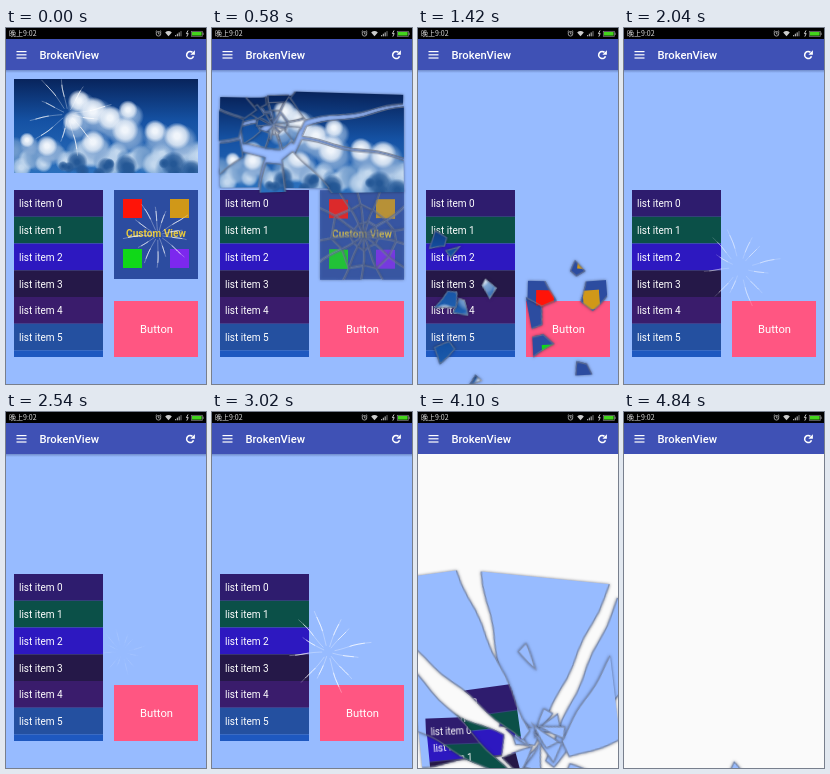
Write an HTML page with a canvas that moves like this. It is 200x356 px and loops after 4860 ms.

```html
<!DOCTYPE html>
<html lang="zh">
<head>
<meta charset="utf-8">
<title>BrokenView</title>
<style>
html, body { margin: 0; width: 100%; height: 100%; overflow: hidden; background: #fafafa; }
canvas { display: block; width: 200px; height: 356px; }
</style>
</head>
<body>
<canvas id="stage" width="200" height="356"></canvas>
<script>
const W = 200, H = 356, LOOP = 4860;
const FONT = 'Roboto, sans-serif';
const ctx = document.getElementById('stage').getContext('2d');

function layer(draw) {
  const c = document.createElement('canvas');
  c.width = W;
  c.height = H;
  draw(c.getContext('2d'));
  return c;
}

function rng(seed) {
  return () => {
    seed = (seed * 16807) % 2147483647;
    return seed / 2147483647;
  };
}

function box(g, color, x, y, w, h) {
  g.fillStyle = color;
  g.fillRect(x, y, w, h);
}

function label(g, text, x, y, size, color = '#fff', weight = 400, align = 'left') {
  g.font = `${weight} ${size}px ${FONT}`;
  g.fillStyle = color;
  g.textAlign = align;
  g.fillText(text, x, y);
}

function line(g, color, width, ...pts) {
  g.strokeStyle = color;
  g.lineWidth = width;
  g.beginPath();
  pts.forEach(p => g.lineTo(p[0], p[1]));
  g.stroke();
}

// ---- Static parts ----
const header = layer(g => {
  box(g, '#000', 0, 0, W, 11);
  box(g, '#3f51b5', 0, 11, W, 31);
  g.font = "7px 'Noto Sans CJK SC', 'Noto Sans CJK', sans-serif";
  g.fillStyle = '#ddd';
  g.fillText('晚上9:02', 3, 8.3);
  g.strokeStyle = '#bbb';
  g.lineWidth = 0.8;
  g.beginPath();
  g.arc(152.5, 5.8, 2.3, 0, 7);
  g.stroke();
  line(g, '#bbb', 0.7, [152.5, 4.2], [152.5, 6], [153.8, 6]);
  line(g, '#bbb', 0.8, [149.6, 3.8], [151, 2.6]);
  line(g, '#bbb', 0.8, [154, 2.6], [155.4, 3.8]);
  g.fillStyle = '#ccc';
  g.beginPath();
  g.moveTo(162.5, 8.3);
  g.arc(162.5, 8.3, 5, -2.3, -0.84);
  g.fill();
  for (let i = 0; i < 4; i++) box(g, i < 3 ? '#aaa' : '#666', 169 + i * 1.8, 7 - i * 1.3, 1.2, 1.3 + i * 1.3);
  line(g, '#ddd', 0.9, [182, 2.5], [180.4, 5.6], [182.2, 5.6], [180.8, 8.6]);
  g.strokeStyle = '#888';
  g.lineWidth = 0.7;
  g.strokeRect(185.3, 3.3, 11, 5);
  box(g, '#43d51c', 186, 4, 9.6, 3.6);
  box(g, '#888', 196.6, 4.6, 1, 2.4);

  for (const y of [23, 26.2, 29.4]) box(g, '#fff', 10.5, y, 10, 1.2);
  label(g, 'BrokenView', 33.5, 31, 11.2, '#fff', 500);
  g.strokeStyle = '#fff';
  g.lineWidth = 1.6;
  g.beginPath();
  g.arc(184.2, 27, 3.5, 0.35, 5.4);
  g.stroke();
  g.fillStyle = '#fff';
  g.beginPath();
  g.moveTo(188.9, 22.3);
  g.lineTo(188.9, 26.8);
  g.lineTo(184.4, 26.8);
  g.fill();
});

const content = layer(g => {
  box(g, '#97bbff', 0, 42, W, H - 42);
  const rows = ['#2e1c6e', '#0b5048', '#2d18c0', '#251848', '#3a1c6c', '#2450a0', '#1e58c0'];
  rows.forEach((color, i) => {
    const y = 162 + i * 26.75;
    box(g, color, 8, y, 89, Math.min(26.8, 329 - y));
    if (i < 6) label(g, 'list item ' + i, 13, y + 17.3, 10);
  });
  box(g, '#ff5682', 108, 273, 84, 56);
  label(g, 'Button', 150.5, 305.3, 11.2, '#fff', 400, 'center');
});

const photo = layer(g => {
  g.beginPath();
  g.rect(8, 51, 184, 94);
  g.clip();
  const sky = g.createLinearGradient(0, 51, 0, 145);
  sky.addColorStop(0, '#08245c');
  sky.addColorStop(0.45, '#1552a4');
  sky.addColorStop(1, '#2b70bd');
  box(g, sky, 0, 51, W, 94);
  const puff = (x, y, r, color) => {
    const glow = g.createRadialGradient(x, y, r * 0.2, x, y, r);
    glow.addColorStop(0, color);
    glow.addColorStop(0.6, color + 'b0');
    glow.addColorStop(1, color + '00');
    g.fillStyle = glow;
    g.beginPath();
    g.arc(x, y, r, 0, 7);
    g.fill();
  };
  const r = rng(29);
  for (let i = 0; i < 26; i++) puff(8 + i * 7.4, 123 + r() * 18, 8 + r() * 8, i % 3 ? '#c3d8ee' : '#6f9acb');
  [[74, 75, 15], [88, 85, 19], [105, 92, 17], [123, 84, 13], [68, 95, 14], [120, 104, 18],
   [150, 105, 15], [172, 110, 18], [42, 120, 14], [22, 114, 10], [88, 116, 16]]
    .forEach(([x, y, s]) => {
      puff(x + 2, y + 4, s, '#86a9d4');
      puff(x - 1, y - 2, s * 0.75, '#f0f5fb');
    });
  for (let i = 0; i < 14; i++) puff(12 + r() * 176, 134 + r() * 12, 5 + r() * 9, '#245795');
});

const custom = layer(g => {
  box(g, '#2c4ca0', 108, 162, 84, 89);
  box(g, '#ff1408', 117, 171, 19, 19);
  box(g, '#d09818', 164, 171, 19, 19);
  box(g, '#10d818', 117, 221, 19, 19);
  box(g, '#7c28ee', 164, 221, 19, 19);
  label(g, 'Custom View', 150, 208.5, 10.1, '#e6c73c', 700, 'center');
});

// ---- Shattering ----
// ends: where each crack leaves the rect, clockwise; slow: lagging pieces and their speed
function shatter({ image, rect, at, ends, rings, seed, start, fall, speed, slow = {}, drift = 0 }) {
  const rand = rng(seed);
  const [cx, cy] = at;
  const rays = ends.map(([x, y]) => {
    const len = Math.hypot(x - cx, y - cy);
    return { x: (x - cx) / len, y: (y - cy) / len, len, phase: rand() * 6,
             rings: rings.map(r => Math.min(r * (0.85 + rand() * 0.35), len * 0.8)) };
  });
  const point = (ray, d) => {
    const bend = Math.sin(d / 11 + ray.phase) * Math.min(1.3, d / 20);
    return [cx + ray.x * d - ray.y * bend, cy + ray.y * d + ray.x * bend];
  };
  const along = (ray, from, to) =>
    Array.from({ length: 13 }, (_, i) => point(ray, from + (to - from) * i / 12));

  const pieces = [];
  rays.forEach((a, i) => {
    const b = rays[(i + 1) % rays.length];
    for (let k = 0; k <= rings.length; k++) {
      const outer = k === rings.length;
      const a0 = k ? a.rings[k - 1] : 0, b0 = k ? b.rings[k - 1] : 0;
      const a1 = outer ? a.len : a.rings[k], b1 = outer ? b.len : b.rings[k];
      const path = along(a, a0, a1);
      if (outer) {
        const far = 420;
        path.push([cx + a.x * far, cy + a.y * far],
                  [cx + (a.x + b.x) * far, cy + (a.y + b.y) * far],
                  [cx + b.x * far, cy + b.y * far]);
      }
      path.push(...along(b, b0, b1).reverse());
      const corners = [point(a, a0), point(a, a1), point(b, b0), point(b, b1)];
      const sprite = layer(g => {
        g.beginPath();
        g.rect(...rect);
        g.clip();
        g.beginPath();
        path.forEach(p => g.lineTo(p[0], p[1]));
        g.closePath();
        g.clip();
        g.drawImage(image, 0, 0);
        g.strokeStyle = 'rgba(112,120,140,.7)';
        g.lineWidth = 2.4;
        g.stroke();
      });
      const pace = rand(), lag = slow[i * (rings.length + 1) + k];
      pieces.push({
        sprite,
        x: corners.reduce((s, p) => s + p[0], 0) / 4,
        y: corners.reduce((s, p) => s + p[1], 0) / 4,
        speed: lag || (outer ? speed[1] : speed[0]) * (0.8 + pace * 0.4),
        spin: (rand() - 0.5) * (outer ? 0.9 : 1.6) * (lag ? 0.5 : 1),
        tilt: rand() * 0.7,
        drift: (rand() - 0.5) * 16 + drift
      });
    }
  });

  function cracks(radius, alpha, inner = 0.15) {
    ctx.save();
    ctx.beginPath();
    ctx.rect(...rect);
    ctx.clip();
    rays.forEach((ray, i) => {
      const end = radius * (0.82 + 0.18 * Math.sin(i * 2.3 + 1));
      ctx.globalAlpha = alpha * 0.55;
      line(ctx, '#fff', 0.7, ...along(ray, end * inner, end));
      ctx.globalAlpha = alpha;
      line(ctx, '#fff', 0.9, ...along(ray, end * 0.5, end * 0.85));
    });
    ctx.restore();
  }

  function drop(t) {
    const s = (t - fall) / 1000;
    const move = Math.pow(s, 2.5);
    for (const p of pieces) {
      const y = p.speed * move;
      if (y > H + 160) continue;
      ctx.save();
      ctx.globalAlpha = Math.min(1, 0.78 + Math.max(0, s - 0.15) * 2);
      ctx.shadowColor = 'rgba(20,25,45,.55)';
      ctx.shadowBlur = 3;
      ctx.translate(p.x + p.drift * s * s, p.y + y);
      ctx.rotate(p.spin * s * s);
      ctx.scale(Math.cos(p.tilt * s), 1);
      ctx.drawImage(p.sprite, -p.x, -p.y);
      ctx.restore();
    }
  }

  return {
    cracks,
    draw(t) {
      if (t >= fall) drop(t);
      else {
        if (t < fall) ctx.drawImage(image, 0, 0);
        if (t > start) cracks(reach(t - start), 0.8);
      }
    }
  };
}

const reach = ms => 0.26 * ms + 0.0001 * ms * ms;

const windowBreak = shatter({
  image: content, rect: [0, 42, W, H - 42], at: [116, 240], rings: [31], seed: 71,
  ends: [[54, 42], [190, 42], [200, 138], [200, 222], [200, 258], [200, 342], [153, 356],
         [74, 356], [20, 356], [0, 247], [0, 175], [0, 117]],
  start: 2860, fall: 3480, speed: [270, 400], slow: { 22: 63 }
});

const photoBreak = shatter({
  image: photo, rect: [8, 51, 184, 94], at: [62, 86], rings: [15, 32], seed: 413,
  ends: [[36, 51], [56, 51], [83, 51], [192, 61], [192, 112], [118, 145], [75, 145],
         [47, 145], [8, 128], [8, 94], [8, 62]],
  start: -160, fall: 300, speed: [255, 400], drift: -8,
  slow: { 24: 100, 22: 125, 19: 128, 16: 116, 25: 170, 28: 98 }
});

const customBreak = shatter({
  image: custom, rect: [108, 162, 84, 89], at: [152, 207], rings: [13, 30], seed: 907,
  ends: [[128, 162], [146, 162], [167, 162], [192, 178], [192, 199], [192, 215], [192, 238],
         [170, 251], [150, 251], [130, 251], [108, 234], [108, 211], [108, 180]],
  start: -130, fall: 500, speed: [340, 420],
  slow: { 7: 62, 8: 112, 35: 108, 38: 112, 32: 118, 23: 118, 25: 182 }
});

// A short press on the window: cracks spread, then pull back.
function shortPress(t) {
  if (t < 1890 || t > 2600) return;
  const back = Math.max(0, (t - 2300) / 300);
  const radius = reach(Math.min(t, 2300) - 1890) * (1 - back);
  windowBreak.cracks(radius, 0.5 * (1 - back), 0.3);
}

const started = performance.now();

function frame() {
  const t = (performance.now() - started) % LOOP;
  box(ctx, '#fafafa', 0, 0, W, H);
  windowBreak.draw(t);
  shortPress(t);
  if (t < 2400) {
    customBreak.draw(t);
    photoBreak.draw(t);
  }
  if (t < 3480) {
    const shade = ctx.createLinearGradient(0, 42, 0, 45);
    shade.addColorStop(0, 'rgba(20,30,80,.3)');
    shade.addColorStop(1, 'rgba(20,30,80,0)');
    box(ctx, shade, 0, 42, W, 3);
  }
  ctx.drawImage(header, 0, 0);
  requestAnimationFrame(frame);
}
frame();
</script>
</body>
</html>
```
